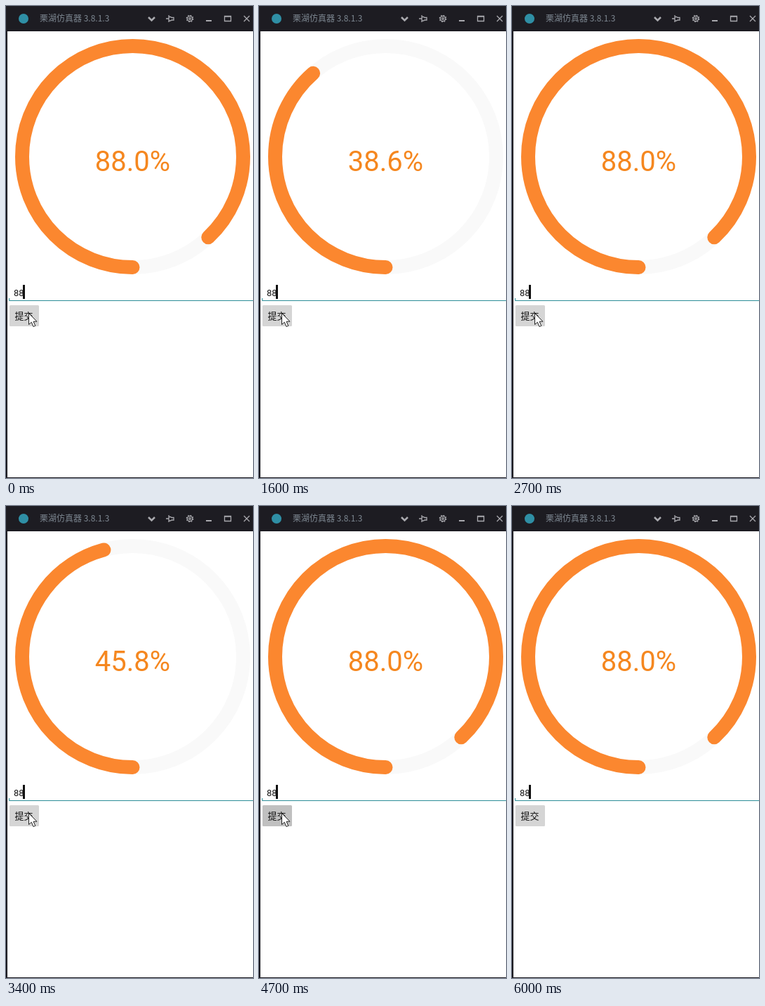
An HTML page that plays this animation: 352x672 px, repeating every 6.1 s.

```html
<!DOCTYPE html>
<html lang="zh">
<head>
<meta charset="utf-8">
<style>
  html, body { margin: 0; width: 100%; height: 100%; overflow: hidden; background: #fff; }
  svg { display: block; }
  .cjk { font-family: "Noto Sans CJK SC", "Noto Sans CJK", sans-serif; }
  .latin { font-family: Roboto, sans-serif; }
  .icons { fill: none; stroke: #a9a9ae; stroke-width: 1.3; }
  .ring { fill: none; stroke-width: 20; }
</style>
</head>
<body>
<svg width="352" height="672" viewBox="0 0 352 672">
  <rect width="352" height="672" fill="#1d1c22"/>
  <rect x="2" y="36" width="350" height="635" fill="#fff"/>

  <circle cx="25" cy="18" r="7" fill="#2f8fa5"/>
  <text class="cjk" x="48" y="22.3" font-size="12" fill="#7d8791">栗湖仿真器 3.8.1.3</text>
  <g class="icons">
    <path d="M203 16l4.5 4.5 4.5-4.5" stroke-width="2.6"/>
    <path d="M228 18h4M232 13v10M232 15.5h2.5l1.500 1h3v3.500h-3l-1.500 1h-2.500"/>
    <circle cx="262" cy="18" r="3.600"/>
    <circle cx="262" cy="18" r="1.300"/>
    <circle cx="262" cy="18" r="4.700" stroke-dasharray="1.850 1.840"/>
    <path d="M285 21h8" stroke-width="2"/>
    <path d="M311.500 14.500h9v7h-9zM311 15h10"/>
    <path d="M339 14l8 8M347 14l-8 8"/>
  </g>

  <circle class="ring" cx="180.500" cy="214.500" r="157.500" stroke="#f9f9f9"/>
  <path id="arc" class="ring" pathLength="100" stroke="#fb872f" stroke-linecap="round"
        d="M180.500 372a157.500 157.500 0 0 1 0-315a157.500 157.500 0 0 1 0 315"/>
  <text id="label" class="latin" x="180.500" y="235" font-size="40" text-anchor="middle" fill="#f5871f"></text>

  <text class="latin" x="11" y="413" font-size="13" fill="#111">88</text>
  <rect x="24" y="397" width="3" height="20" fill="#111"/>
  <path d="M4.500 416v3.500H352" fill="none" stroke="#2b8d98"/>

  <rect id="button" x="5" y="426" width="42" height="30" rx="1.500"/>
  <text class="cjk" x="12.500" y="445.500" font-size="13" font-weight="500" fill="#111">提交</text>
  <path id="pointer" d="M.5.5v16l3.800-3.300 2.700 6.300 2.800-1.200-2.700-6.100h4.900z" fill="#fff" stroke="#222"/>
</svg>
<script>
  const LOOP = 6100, STEP = 100, GOAL = 88, RISE = 600;
  const starts = [1323.5, 3092.2, 4753.7];
  const [arc, label, button, pointer] =
    ["arc", "label", "button", "pointer"].map(id => document.getElementById(id));

  const ease = p => (1 - Math.cos(Math.PI * p)) / 2;

  function valueAt(t) {
    const start = starts.findLast(s => s <= t);
    return start === undefined ? GOAL : GOAL * ease(Math.min(1, (t - start) / RISE));
  }

  function draw(t) {
    const value = valueAt(t);
    arc.setAttribute("stroke-dasharray", `${Math.max(value, 0.01)} 200`);
    label.textContent = value.toFixed(1) + "%";

    const pressed = starts.some(s => t > s - 200 && t < s + 50);
    button.setAttribute("fill", pressed ? "#c0c0c0" : "#d5d5d5");

    // The pointer accelerates away to the upper right.
    const k = (Math.max(0, t - 5000) / 200) ** 2;
    pointer.setAttribute("transform", `translate(${32 + 35 * k} ${437 - 20 * k})`);
  }

  function tick(now) {
    draw(Math.floor((now + 8) / STEP) * STEP % LOOP);
    requestAnimationFrame(tick);
  }
  tick(performance.now());
</script>
</body>
</html>
```
